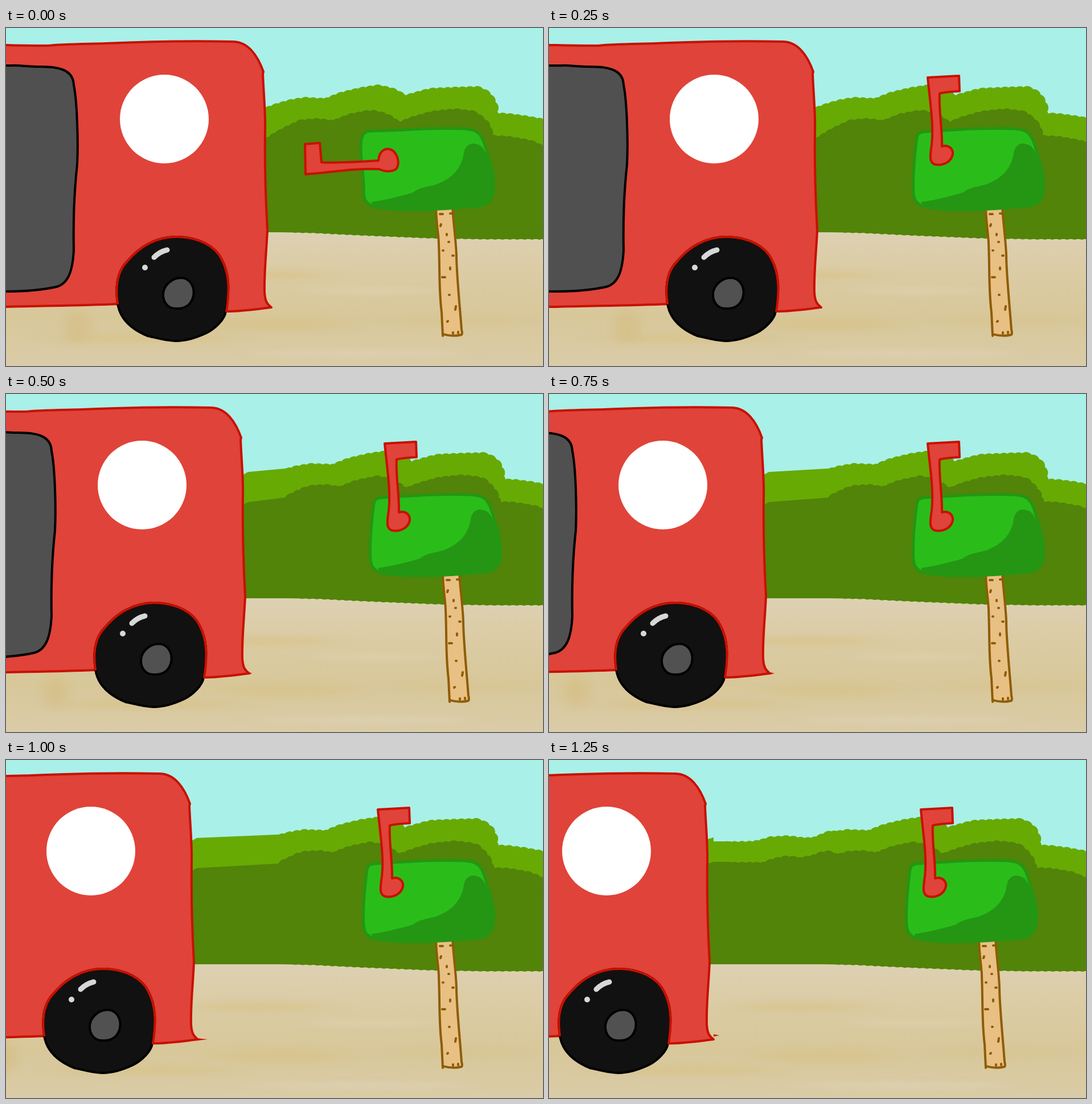
These frames come from a looping animation (943x594 px, 1.5 s). An HTML page:

```html
<!DOCTYPE html>
<html lang="en">
<head>
<meta charset="utf-8">
<title>Van and mailbox</title>
<style>
  html, body { margin: 0; height: 100%; overflow: hidden; background: #a9f0e8; }
  svg { display: block; width: 100%; height: 100%; }
  path, polyline { stroke-linecap: round; stroke-linejoin: round; }
  .leaf { stroke-width: 24; stroke-dasharray: 0 13; }
  .light { fill: #67aa04; stroke: #67aa04; }
  .dark { fill: #518408; stroke: #518408; }
  .flat { stroke: none; }
  .red { fill: #e04339; stroke: #c81000; stroke-width: 4; }
  .black { stroke: #000; stroke-width: 4; }
  .line { fill: none; }
</style>
</head>
<body>
<svg viewBox="0 0 943 594" preserveAspectRatio="none">
  <defs>
    <linearGradient id="sand" x2="0" y2="1">
      <stop offset="0" stop-color="#ddd1b4"/>
      <stop offset=".25" stop-color="#dccda8"/>
      <stop offset=".65" stop-color="#d8c799"/>
      <stop offset="1" stop-color="#dacca8"/>
    </linearGradient>
    <filter id="soft" x="-50%" y="-150%" width="200%" height="400%">
      <feGaussianBlur stdDeviation="22 5"/>
    </filter>
    <filter id="dust" x="-50%" y="-50%" width="200%" height="200%">
      <feGaussianBlur stdDeviation="8"/>
    </filter>
  </defs>

  <rect y="350" width="943" height="244" fill="url(#sand)"/>

  <g id="scene">
    <g filter="url(#soft)" fill="#d7c286" opacity=".55">
      <ellipse cx="445" cy="434" rx="120" ry="9"/>
      <ellipse cx="480" cy="521" rx="115" ry="11"/>
      <ellipse cx="240" cy="545" rx="160" ry="9"/>
      <ellipse cx="790" cy="515" rx="110" ry="6" opacity=".5"/>
      <ellipse cx="640" cy="462" rx="120" ry="6" fill="#e0d3b2"/>
      <ellipse cx="620" cy="572" rx="190" ry="7" fill="#dfd3b6"/>
    </g>

    <g id="lightHedge"></g>
    <g id="darkHedge"></g>
    <path class="dark flat" d="M260 240H960V371H840L740 369 620 364 540 360 480 359 260 359Z"/>
    <polyline class="dark line" stroke-width="18" stroke-dasharray="0 13"
      points="508,351 540,352 620,356 740,361 840,363 960,363"/>

    <path fill="#e8c083" stroke="#8f5c05" stroke-width="4" d="M755 312C755 340 760 365 760 380C762 430 760 460 765 500L767 541V538Q785 543 800 539Q802 538 800 530C797 490 791 430 791 400C790 370 785 340 784 312"/>
    <path class="line" stroke="#8f5c05" stroke-width="4" d="M762 327h5M780 326h2M764 345l-1 3M774 362v2M777 376h1M767 391h1M784 400h2M780 421v3M766 438h5M778 469h1M790 489l-1 6M776 515l-1 1M785 535v2M794 534v2"/>

    <path id="box" fill="#2abd1a" stroke="#249613" stroke-width="5"/>
    <path fill="#249613" d="M641 306C660 303 690 297 715 289C724 281 740 279 755 275C783 265 800 247 804 220C806 205 818 201 826 204C836 206 840 212 848 235C856 260 857 275 854 292C850 312 840 312 800 314C750 320 690 322 645 313Z"/>
    <path id="flag" class="red"/>
  </g>

  <g id="van">
    <ellipse cx="126" cy="524" rx="22" ry="26" fill="#d2b46a" opacity=".3" filter="url(#dust)"/>
    <path class="red" d="M-30 30H0C30 31 55 31 75 31C95 28 140 28 175 27C220 25 300 22 400 24C425 25 442 48 452 77L451 80C452 110 456 150 455 180C454 250 457 320 459 355C457 400 453 430 454 465C455 480 458 485 466 491C440 494 415 498 387 498L196 485C130 488 70 488 0 490H-30Z"/>
    <path id="tip" fill="#c81000"/>
    <path class="black" fill="#505050" d="M-30 66H10C25 65 35 68 62 68C100 68 118 77 119 100C125 130 127 200 125 240C120 285 118 340 119 390C117 430 108 450 88 455C60 461 35 463 0 463H-30Z"/>
    <circle cx="278" cy="160" r="78" fill="#fff"/>
    <path class="black" fill="#111" d="M196 484C191 450 198 425 213 410C232 387 262 366 302 367C340 368 368 384 379 407C392 432 393 460 386 498C384 512 368 528 352 536C335 544 318 550 298 550C278 549 262 544 248 541C222 530 200 512 196 484Z"/>
    <path class="red" style="fill:none" d="M196 484C191 450 198 425 213 410C232 387 262 366 302 367C340 368 368 384 379 407C392 432 393 460 387 498"/>
    <path class="black" fill="#515151" d="M308 439C324 440 332 456 329 471C326 484 317 493 301 493C286 494 275 484 276 466C278 451 292 439 308 439Z"/>
    <path class="line" stroke="#d6d8d7" stroke-width="9" d="M260 403Q270 393 283 390"/>
    <circle cx="244" cy="421" r="5" fill="#d6d8d7"/>
  </g>
</svg>

<script>
const $ = id => document.getElementById(id);
const STEP = 250;
const vanX = [0, 12, -39, -78, -129, -177];
const sceneX = [0, 12, 12, 12, 0, 0];
const tipLength = [0, 1, 5, 8, 17, 10];

const flagUp = "M653 87L708 84 709 111C695 112 685 112 674 115C672 140 679 180 678 208C690 204 698 213 697 222C694 236 680 242 667 240C657 238 656 230 660 205C664 170 657 130 653 87Z";
const flagDown = "M525 204L551 202 554 236C580 238 620 235 654 233C655 215 668 208 680 216C690 226 691 240 685 248C675 254 664 252 655 248C610 246 570 254 526 257Z";
const boxSide = "C740 176 800 176 812 178C835 179 840 200 845 220C856 250 858 270 855 292C850 312 835 314 800 315C750 320 690 322 645 314C630 307 629 300 628 290";
const boxUp = `M650 182Q680 180 700 179${boxSide}C626 260 630 225 633 200C634 188 636 182 650 182Z`;
const boxDown = `M640 181Q680 180 700 179${boxSide}C630 265 622 235 623 205C624 188 628 182 640 181Z`;

const ridges = {
  light: "486 129 500 125 525 121 562 123 590 112 622 104 655 99 685 107 698 118 720 112 745 105 790 103 828 102 845 110 853 128 853 148 880 149 910 153 943 159 965 164",
  dark: "490 174 520 160 550 158 575 162 605 150 640 143 665 148 690 165 715 155 750 145 790 141 822 145 840 162 849 188 880 189 920 196 943 207 965 213"
};
const nearLeaves = { light: "440 148 456 140 470 134 ", dark: "440 205 456 195 475 183 " };
const farLeaves = {
  light: "300 143 355 142 370 140 390 134 420 132 450 136 470 134 485 127 501 121",
  dark: "300 179 377 179 395 172 420 167 440 171 470 165 485 158 501 161"
};

function leaves(tone, points) {
  const xs = points.split(" ");
  return `<polyline class="leaf ${tone}" transform="translate(0 12)" points="${points} ${xs.at(-2)} 325 ${xs[0]} 325"/>`;
}
const flat = (tone, d) => `<path class="${tone} flat" d="${d}"/>`;

function hedge(tone, n) {
  const edge = 455 + vanX[n] - sceneX[n];
  const [top, joint] = tone === "light" ? [137, 131] : [190, 182];
  if (n < 2) return leaves(tone, nearLeaves[tone] + ridges[tone]);
  const main = leaves(tone, ridges[tone]);
  if (n < 5) return flat(tone, `M${edge} ${top + 5}L${edge + 9} ${top} 478 ${joint}H500V340H${edge}Z`) + main;
  const [start, next] = tone === "light" ? [136, 143] : [179, 179];
  return flat(tone, `M276 ${start + 4}L289 ${start}V${next}H320V340H276Z`) + leaves(tone, farLeaves[tone]) + main;
}

function show(n) {
  $("van").setAttribute("transform", `translate(${vanX[n]} 0)`);
  $("scene").setAttribute("transform", `translate(${sceneX[n]} 0)`);
  $("lightHedge").innerHTML = hedge("light", n);
  $("darkHedge").innerHTML = hedge("dark", n);
  $("flag").setAttribute("d", n ? flagUp : flagDown);
  $("box").setAttribute("d", n ? boxUp : boxDown);
  $("tip").setAttribute("d", `M466 ${n === 5 ? 482 : 489}l${tipLength[n]} 2l${-tipLength[n]} 2Z`);
}

let shown = -1;
function tick() {
  const n = Math.floor(performance.now() / STEP) % vanX.length;
  if (n !== shown) show(shown = n);
  requestAnimationFrame(tick);
}
tick();
</script>
</body>
</html>
```
